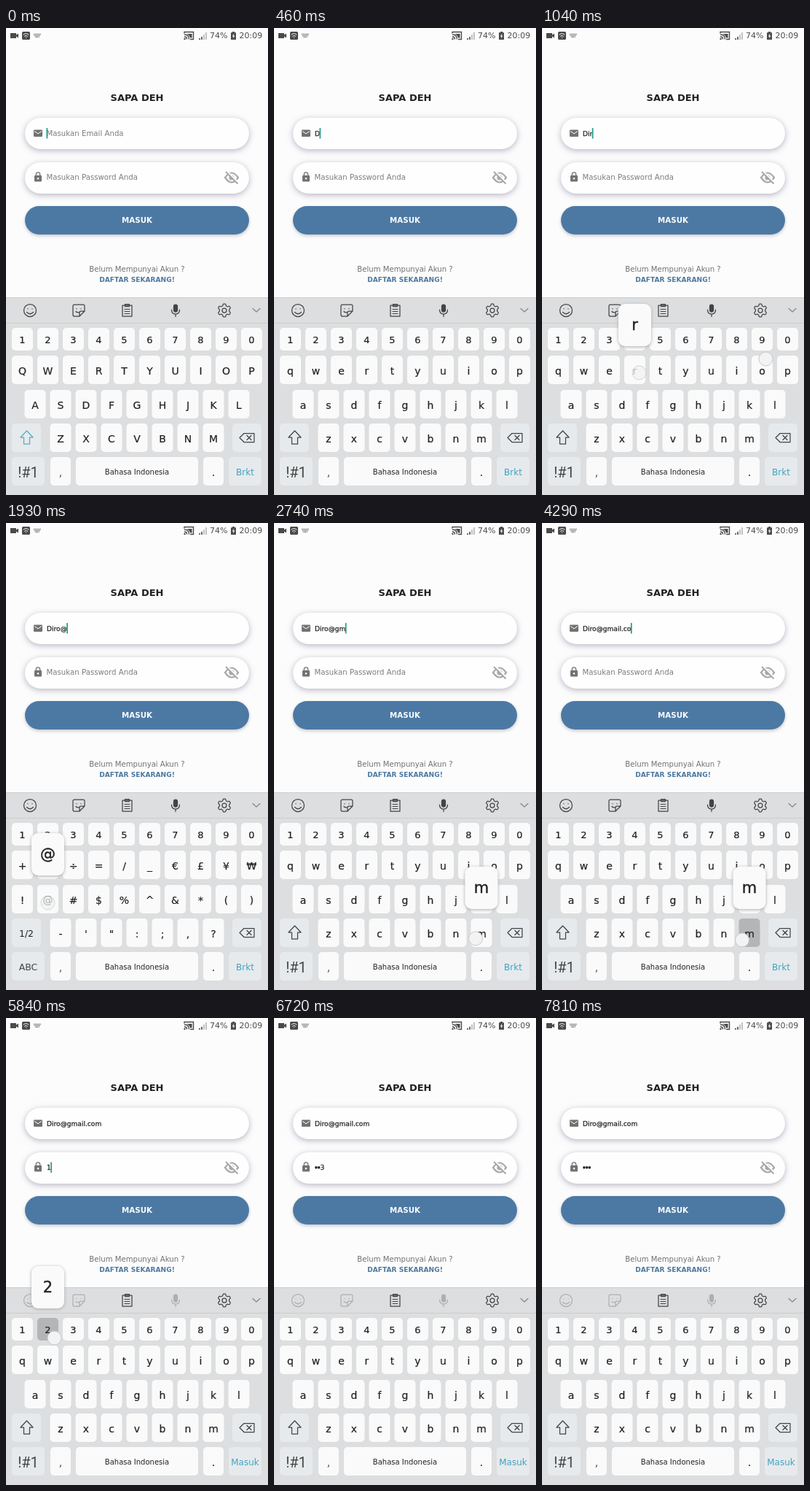
An HTML page for the animation above (8000 ms loop, 360 px wide and 640 px high).

```html
<!DOCTYPE html>
<html lang="id">
<head>
<meta charset="utf-8">
<title>Masuk</title>
<style>
html, body { margin: 0; width: 100%; height: 100%; overflow: hidden; background: #fcfcfc; }
svg { display: block; width: 360px; height: 640px; }
text { font-family: "DejaVu Sans", Verdana, sans-serif; fill: #222; white-space: pre; }
.mid { text-anchor: middle; }
.bold { font-weight: 700; }
.hint { font-size: 10.2px; fill: #7c7c7c; }
.entry { font-size: 9.1px; stroke: #222; stroke-width: .25px; }
.status text { font-size: 11px; fill: #4a4a4a; }
.card { fill: #fefefe; filter: drop-shadow(0 2px 3px #c2c2ca) drop-shadow(0 1px 4px #e6e6f0); }
.button { fill: #4c79a4; filter: drop-shadow(0 2px 2px #c6c8cc); }
.key { fill: #fafafa; }
.key.soft { fill: #e7eaec; }
.key.down { fill: #b3b5b7; }
.label { stroke: #222; stroke-width: .2px; }
.line { fill: none; stroke: #444; stroke-width: 1.25; stroke-linecap: round; stroke-linejoin: round; }
.pop rect { fill: #fafafa; filter: drop-shadow(0 1px 2px #a9abad); }
.dot { fill: #f3f3f3; stroke: #c6c8ca; stroke-width: 1; }
#bullets { font-size: 4.3px; baseline-shift: 2.2px; }
</style>
</head>
<body>
<svg viewBox="0 0 360 640">
  <rect width="360" height="640" fill="#fcfcfc"/>

  <g class="status" fill="#4a4a4a">
    <path d="M6 7h8v2.500l3-2v6l-3-2V14H6z"/>
    <rect x="22" y="5" width="11" height="11" rx="1.500"/>
    <path d="M24 9q3.500-3 7 0M25.500 11.200q2-1.800 4 0M27.500 13.200v.2" fill="none" stroke="#fcfcfc" stroke-linecap="round"/>
    <path d="M38 8.500h10M39 10.500h8M40.500 12.500h5" fill="none" stroke="#777" stroke-width="1.300" stroke-dasharray="1.400 .7"/>
    <path d="M245 7.500V5.500h12.500v10H253M245 9q6.500 0 6.500 6.500M245 12q3.500 0 3.500 3.500" fill="none" stroke="#4a4a4a" stroke-width="1.400"/>
    <path d="M248 8h7.500v5.500H253Q252 9 248 8z"/><circle cx="245.500" cy="15" r="1.200"/>
    <path d="M266 16v-2M269 16v-4" stroke="#4a4a4a" stroke-width="1.600"/>
    <path d="M272 16v-7M275 16V6" stroke="#aaa" stroke-width="1.400"/>
    <path d="M311 5h3v1.300h2V16h-7V6.300h2z"/>
    <path d="M313.300 7.500l-2.500 4h1.700l-.6 3 2.700-4h-1.800z" fill="#fcfcfc"/>
    <text x="280" y="14">74%</text><text x="320.500" y="14">20:09</text>
  </g>

  <text class="mid bold" x="180" y="100" font-size="13">SAPA DEH</text>

  <rect class="card" x="26" y="123" width="308" height="43" rx="21.500"/>
  <rect x="38" y="139.500" width="12" height="9.500" rx="1" fill="#727272"/>
  <path d="M39 141.500l5 3.300 5-3.300" fill="none" stroke="#fefefe"/>
  <rect class="card" x="26" y="184" width="308" height="43" rx="21.500"/>
  <rect x="39" y="202" width="10" height="8.500" rx="1" fill="#727272"/>
  <path d="M41.300 202v-1.500a2.700 2.700 0 0 1 5.400 0v1.500" fill="none" stroke="#727272" stroke-width="1.300"/>
  <circle cx="44" cy="206.200" r="1.200" fill="#fefefe"/>
  <g fill="none" stroke="#a8a8a8" stroke-width="2.200">
    <path d="M301 205q9-13 18 0q-9 13-18 0z"/>
    <circle cx="310" cy="205" r="2.500" fill="#a8a8a8"/>
    <path d="M303.500 196.500l16 16" stroke="#fefefe" stroke-width="3"/>
    <path d="M302 197l16.500 16.500" stroke-width="1.900"/>
  </g>
  <text id="hintMail" class="hint" x="55.500" y="148">Masukan Email Anda</text>
  <text id="hintPass" class="hint" x="55.500" y="208">Masukan Password Anda</text>
  <text id="mail" class="entry" x="56" y="147.500"></text>
  <text id="pass" class="entry" x="56" y="208"><tspan id="bullets"></tspan><tspan id="last"></tspan></text>
  <rect id="caret" width="1.700" height="14.500" fill="#249a86"/>

  <rect class="button" x="26" y="244" width="308" height="39" rx="19.500"/>
  <text class="mid bold" x="180" y="267" font-size="10.300" style="fill:#fbfbfb">MASUK</text>
  <text class="mid" x="180" y="333.500" font-size="10.100" style="fill:#707070">Belum Mempunyai Akun ?</text>
  <text class="mid bold" x="180" y="347.500" font-size="9.100" style="fill:#4c79a0">DAFTAR SEKARANG!</text>

  <rect y="369" width="360" height="271" fill="#dcdee0"/>
  <path d="M0 369.500h360M0 404.500h360" stroke="#cbcdcf"/>
  <g class="line">
    <g class="dim">
      <circle cx="33" cy="387" r="8.500"/>
      <path d="M28.500 389.500q4.500 4.500 9 0M30 384.500v.3M36 384.500v.3"/>
    </g>
    <g class="dim">
      <path d="M94 379h12q2 0 2 2v7l-7 7h-7q-2 0-2-2v-12q0-2 2-2zM108 388h-5q-2 0-2 2v5M97 384.500v.3M103 384.500v.3M96 388.500q2 2 4.500 1"/>
    </g>
    <path d="M160 380h13v15h-13zM163.500 378.500h6v3h-6z"/>
    <path d="M163 385.500h7M163 388.500h7M163 391.500h7" stroke-width="1"/>
    <g class="dim">
      <rect x="230.500" y="379" width="5" height="10" rx="2.500" fill="#444"/>
      <path d="M227.500 386q0 6 5.500 6t5.500-6M233 392v3.500"/>
    </g>
    <path id="gear"/>
    <circle cx="300" cy="387" r="3"/>
    <path d="M339 384.500l5 4.500 5-4.500" stroke="#888"/>
  </g>
  <g id="keys"></g>
  <g id="taps"></g>
</svg>
<script>
const LOOP = 8000, LAG = 20, HOLD = 100, FADE = 130, FOCUS = 4900;
const $ = id => document.getElementById(id);
const keys = {};

function add(parent, tag, attrs, content) {
  const el = document.createElementNS('http://www.w3.org/2000/svg', tag);
  for (const name in attrs) el.setAttribute(name, attrs[name]);
  if (content) el.textContent = content;
  parent.appendChild(el);
  return el;
}

const show = (el, on) => { el.style.display = on ? '' : 'none'; };

function addKey(parent, id, x, y, w, h, soft, size = 14, label = id) {
  const rect = add(parent, 'rect', { class: soft ? 'key soft' : 'key', x, y, width: w, height: h, rx: 5 });
  const cx = x + w / 2;
  const text = add(parent, 'text', { class: 'label mid', x: cx, y: y + h / 2 + 1 + size * .36 }, label);
  text.style.fontSize = size + 'px';
  keys[id] = { rect, text, cx, y, cy: y + h / 2 };
  return keys[id];
}

function addRow(parent, chars, cx, y, h, size) {
  [...chars].forEach((c, i) => addKey(parent, c, cx + i * 35 - 14.5, y, 29, h, false, size));
}

function addLayer(rows) {
  const layer = add($('keys'), 'g', {});
  rows.forEach((row, i) => addRow(layer, row, i == 2 ? 75 : row.length == 9 ? 40 : 22.5, [449, 496, 542][i], 39));
  return layer;
}

function addPlain(parent, id, x, w, color, size, label) {
  const key = addKey(parent, id, x, 588, w, 39, true, size, label);
  key.text.style.fill = color;
  key.text.style.stroke = 'none';
  return key;
}

const board = $('keys');
addRow(board, '1234567890', 22.5, 411, 31, 13);

const layers = {
  caps: addLayer(['QWERTYUIOP', 'ASDFGHJKL', 'ZXCVBNM']),
  low: addLayer(['qwertyuiop', 'asdfghjkl', 'zxcvbnm']),
  sym: addLayer(['+×÷=/_€£¥₩', '!@#$%^&*()', '-\'":;,?'])
};
for (const name of ['caps', 'low']) {
  const g = layers[name];
  add(g, 'rect', { class: 'key soft', x: 8, y: 542, width: 40, height: 39, rx: 5 });
  const arrow = add(g, 'path', { class: 'line', d: 'M28.500 552l8.500 9h-4.500v9h-8v-9H20z' });
  if (name == 'caps') arrow.style.stroke = '#4db0c4';
  const sym = addPlain(g, name + 'Sym', 8, 45, '#444', 20, '!#1');
  sym.text.style.fontFamily = 'Roboto, sans-serif';
}
addKey(layers.sym, '1/2', 8, 542, 40, 39, true, 12.5).text.style.stroke = 'none';
addPlain(layers.sym, 'ABC', 8, 45, '#444', 12.5);

add(board, 'rect', { class: 'key soft', x: 311, y: 542, width: 40, height: 39, rx: 5 });
add(board, 'path', { class: 'line', d: 'M321 561.500l6-6h14v12h-14zM331 558.500l6 6M337 558.500l-6 6' });
addKey(board, ',', 61, 588, 28, 39).text.style.fill = '#777';
addKey(board, 'space', 96, 588, 168, 39, false, 10, 'Bahasa Indonesia').text.style.stroke = 'none';
addKey(board, '.', 271, 588, 28, 39);
const enter = addPlain(board, 'enter', 306, 45, '#3fa3c2', 12, 'Brkt');

// gear outline: radius swings between teeth
let outline = '';
for (let i = 0; i < 72; i++) {
  const a = i / 72 * Math.PI * 2, r = 7.8 + 1.2 * Math.tanh(2.5 * Math.cos(a * 6));
  outline += (i ? 'L' : 'M') + (300 + r * Math.sin(a)).toFixed(2) + ' ' + (387 - r * Math.cos(a)).toFixed(2);
}
$('gear').setAttribute('d', outline + 'Z');

// key, press, release, finger offset
const taps = [
  ['D', 50, 140, 4, 3], ['i', 470, 580, 3, 2], ['r', 900, 1010, 6, 4], ['o', 1030, 1130, 5, -15],
  ['lowSym', 1290, 1400, 3, 2], ['@', 1760, 1895, 0, 5], ['ABC', 2100, 2190, 2, 3],
  ['g', 2480, 2560, 4, 6], ['m', 2660, 2740, -8, 8], ['a', 2860, 2940, 4, 6],
  ['i', 3040, 3120, 4, -2], ['l', 3280, 3360, -4, 6], ['.', 3700, 3780, -3, 0],
  ['c', 4000, 4100, 6, 8], ['o', 4080, 4165, 2, 4], ['m', 4250, 4380, -10, 10],
  ['enter', 4780, 4880, 0, 0], ['1', 5560, 5640, 6, 10], ['2', 5800, 5890, 9, 12], ['3', 6020, 6110, 6, 10]
].map(([id, down, up, dx, dy]) => {
  const key = keys[id], pop = add($('taps'), 'g', { class: 'pop' });
  const char = id.length == 1;
  if (char) {
    const x = Math.max(8, key.cx - 22.5), y = key.y - 71;
    add(pop, 'rect', { x, y, width: 45, height: 58, rx: 9 });
    add(pop, 'text', { class: 'mid', x: x + 22.5, y: y + 36, 'font-size': 21, stroke: '#222', 'stroke-width': .4 }, id);
  }
  const dot = add($('taps'), 'circle', { class: 'dot', cx: key.cx + dx, cy: key.cy + dy, r: 9.5 });
  return { id, key, char, down, up, pop, dot };
});

function render(t) {
  const layer = t < 160 ? 'caps' : t > 1410 && t < 2200 ? 'sym' : 'low';
  for (const name in layers) show(layers[name], name == layer);

  const inPass = t >= FOCUS;
  let mail = '', pass = '', edited = inPass ? FOCUS : 0;
  for (const id in keys) keys[id].rect.classList.remove('down');
  for (const tap of taps) {
    if (t >= tap.down + LAG && t < tap.up) tap.key.rect.classList.add('down');
    show(tap.pop, t >= tap.down + LAG && t < tap.up + HOLD);
    show(tap.dot, t >= tap.down && t < tap.up + FADE);
    tap.dot.style.opacity = Math.max(0, Math.min(1, 1 - (t - tap.up) / FADE));
    if (t < tap.up || !tap.char) continue;
    if (tap.up < FOCUS) mail += tap.id; else pass += tap.id;
    edited = Math.max(edited, tap.up);
  }

  $('mail').textContent = mail;
  show($('hintMail'), !mail);
  show($('hintPass'), !pass);
  const hidden = t - edited > 1500 ? pass.length : Math.max(0, pass.length - 1);
  $('bullets').textContent = '●'.repeat(hidden);
  $('last').textContent = pass.slice(hidden);

  const field = inPass ? $('pass') : $('mail');
  const width = (inPass ? pass : mail) ? field.getComputedTextLength() : 0;
  $('caret').setAttribute('x', 55.5 + width);
  $('caret').setAttribute('y', inPass ? 197.5 : 137);
  show($('caret'), (t - edited) % 1000 < 500);

  enter.text.textContent = inPass ? 'Masuk' : 'Brkt';
  document.querySelectorAll('.dim').forEach(el => { el.style.opacity = inPass ? .3 : 1; });
}

const start = performance.now();
function tick() {
  render((performance.now() - start) % LOOP);
  requestAnimationFrame(tick);
}
render(0);
requestAnimationFrame(tick);
</script>
</body>
</html>
```
